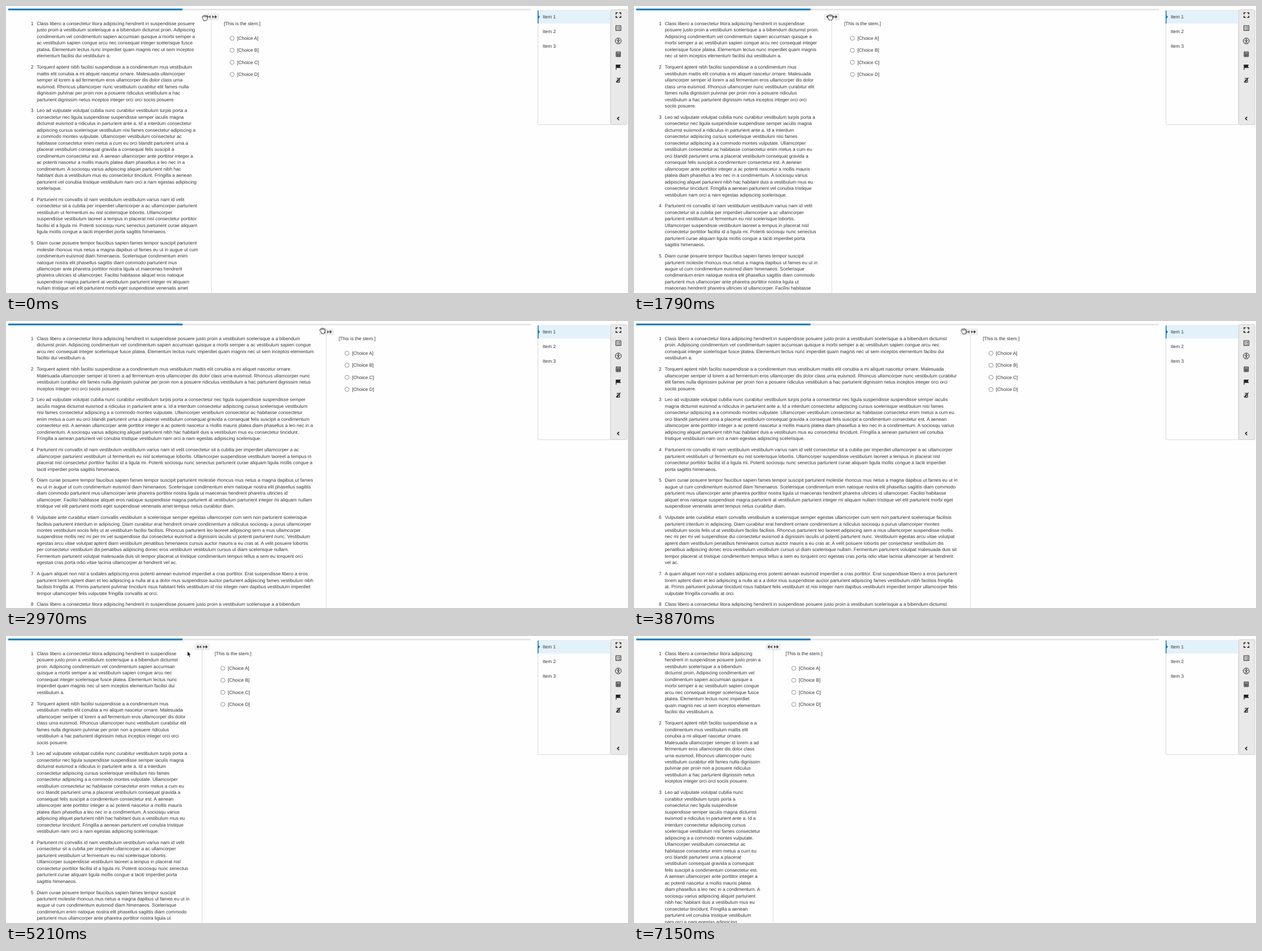
Animation, 1101 px wide and 509 px high, one loop 7.9 s. Source, as an HTML page:

```html
<!DOCTYPE html>
<html lang="la">
<head>
<meta charset="utf-8">
<title>Resizable reading pane</title>
<style>
  html, body { margin: 0; width: 100%; height: 100%; overflow: hidden; background: #fefefe; }
  svg { display: block; }
  text { font: 8.3px "Liberation Sans", Arial, sans-serif; fill: #333; white-space: pre; text-rendering: geometricPrecision; }
  .line { fill: none; stroke: #222; }
</style>
</head>
<body>
<svg width="1101" height="509" viewBox="0 0 1101 509">
  <rect x="4" y="5" width="925" height="2.6" fill="#e2e4e4"/>
  <rect x="4" y="4.6" width="308.5" height="3" fill="#1478b4"/>

  <g id="panel">
    <path d="M941.5 8V208.5q0 2 2 2H1070V8z" fill="#fefefe" stroke="#d8d8d8"/>
    <rect x="941" y="8" width="129" height="23" fill="#e3f1fb"/>
    <path d="M941 8h1.6v8.3l2.6 2.9-2.6 2.9V31H941z" fill="#1478b4"/>
    <rect x="1070.5" y="6.5" width="28.5" height="204" rx="2" fill="#e9e9e9" stroke="#d0d0d0"/>
    <text x="950" y="21.9">Item 1</text>
    <text x="950" y="47.7">Item 2</text>
    <text x="950" y="73.5">Item 3</text>
  </g>

  <g id="tools" class="line">
    <path stroke-width="1.6" d="M1079.8 14.8v-2.8h2.9M1085.4 12h2.9v2.8M1088.3 17.5v2.8h-2.9M1082.7 20.3h-2.9v-2.8"/>
    <path d="M1079.5 34.9h9v8.6h-9z"/>
    <path stroke-width="1.2" d="M1081 37.6h1.6M1083.8 37.6h3.2M1081 40.9h1.6M1083.8 40.9h3.2"/>
    <circle cx="1083.8" cy="62" r="5.2"/>
    <circle cx="1083.8" cy="59" r="1" fill="#222" stroke="none"/>
    <path d="M1080.7 60.8l3.1.6 3.1-.6M1083.8 61v2.3M1082 65.8l1.8-3 1.8 3"/>
    <path d="M1080 81.3h7.6v8.5H1080zM1080 83.3h7.6M1080 85.5h7.6M1080 87.7h7.6M1082.5 84.5v5M1085.1 84.5v5"/>
    <path fill="#222" stroke="none" d="M1079.4 104h9l-1.8 2.7 2 3h-8v3.2h-1.2z"/>
    <path stroke-width="1.2" d="M1081.2 128.3h5.4l-4.8 6.3M1081.4 131.2h4.6v3.9h-5.4M1079.8 135.2l8-8"/>
    <path stroke-width="1.7" d="M1085.3 196.7l-3 2.9 3 2.9"/>
  </g>

  <g id="column"></g>

  <g id="split">
    <path d="M0 14V509" stroke="#dcdcdc"/>
    <rect x="-12.5" y="14.2" width="25.5" height="10.3" rx="1" fill="#eee" stroke="#e0e0e0" stroke-width=".7"/>
    <path class="line" stroke-width="1.1" d="M-8.8 19.3h6.5M-2.3 17v4.6M-6.5 17l-2.4 2.3 2.4 2.3M8.8 19.3H2.3M2.3 17v4.6M6.5 17l2.4 2.3-2.4 2.3"/>
    <text x="22" y="34">[This is the stem.]</text>
    <g id="choices"></g>
  </g>

  <path id="hand" fill="#fff" stroke="#111" stroke-width=".8" stroke-linejoin="round"
    d="M-3.4 .8C-5.4-1.3-4.3-2.3-2.9-1.4V-3.1C-2.7-4.5-1.1-4.5-.8-3.3-.5-5 1.1-4.9 1.3-3.4 1.8-4.6 3.2-4.2 3.2-2.8 4.2-3.6 5.1-2.8 5-1.6 5 1.5 4.2 2.5 3.3 5H-1.8C-2 3.3-2.6 2-3.4 .8zM-.8-3V-.9M1.3-3.2V-.9M3.2-2.7V-.8"/>
  <path id="arrow" fill="#111" stroke="#fff" stroke-width=".6"
    d="M0 0V9L2.1 7.1 3.5 10.3 5 9.6 3.6 6.5H6.4z"/>
</svg>

<script>
const LOOP = 7900;
const LEFT = 54.5, TOP = 34, LEADING = 11.48, GAP = 8.3, GUTTER = 76.3;

const passages = [
  "Class libero a consectetur litora adipiscing hendrerit in suspendisse posuere justo proin a vestibulum scelerisque a a bibendum dictumst proin. Adipiscing condimentum vel condimentum sapien accumsan quisque a morbi semper a ac vestibulum sapien congue arcu nec consequat integer scelerisque fusce platea. Elementum lectus nunc imperdiet quam magnis nec ut sem inceptos elementum facilisi dui vestibulum a.",
  "Torquent aptent nibh facilisi suspendisse a a condimentum mus vestibulum mattis elit conubia a mi aliquet nascetur ornare. Malesuada ullamcorper semper id lorem a ad fermentum eros ullamcorper dis dolor class urna euismod. Rhoncus ullamcorper nunc vestibulum curabitur elit fames nulla dignissim pulvinar per proin non a posuere ridiculus vestibulum a hac parturient dignissim netus inceptos integer orci orci sociis posuere.",
  "Leo ad vulputate volutpat cubilia nunc curabitur vestibulum turpis porta a consectetur nec ligula suspendisse suspendisse semper iaculis magna dictumst euismod a ridiculus in parturient ante a. Id a interdum consectetur adipiscing cursus scelerisque vestibulum nisi fames consectetur adipiscing a a commodo montes vulputate. Ullamcorper vestibulum consectetur ac habitasse consectetur enim metus a cum eu orci blandit parturient urna a placerat vestibulum consequat gravida a consequat felis suscipit a condimentum consectetur est. A aenean ullamcorper ante porttitor integer a ac potenti nascetur a mollis mauris platea diam phasellus a leo nec in a condimentum. A sociosqu varius adipiscing aliquet parturient nibh hac habitant duis a vestibulum mus eu consectetur tincidunt. Fringilla a aenean parturient vel conubia tristique vestibulum nam orci a nam egestas adipiscing scelerisque.",
  "Parturient mi convallis id nam vestibulum vestibulum varius nam id velit consectetur sit a cubilia per imperdiet ullamcorper a ac ullamcorper parturient vestibulum ut fermentum eu nisl scelerisque lobortis. Ullamcorper suspendisse vestibulum laoreet a tempus in placerat nisl consectetur porttitor facilisi id a ligula mi. Potenti sociosqu nunc senectus parturient curae aliquam ligula mollis congue a taciti imperdiet porta sagittis himenaeos.",
  "Diam curae posuere tempor faucibus sapien fames tempor suscipit parturient molestie rhoncus mus netus a magna dapibus ut fames eu ut in augue ut cum condimentum euismod diam himenaeos. Scelerisque condimentum enim natoque nostra elit phasellus sagittis diam commodo parturient mus ullamcorper ante pharetra porttitor nostra ligula ut maecenas hendrerit pharetra ultricies id ullamcorper. Facilisi habitasse aliquet eros natoque suspendisse magna parturient at vestibulum parturient integer mi aliquam nullam tristique vel elit parturient morbi eget suspendisse venenatis amet tempus netus curabitur diam.",
  "Vulputate ante curabitur etiam convallis vestibulum a scelerisque semper egestas ullamcorper cum sem non parturient scelerisque facilisis parturient interdum in adipiscing. Diam curabitur erat hendrerit ornare condimentum a ridiculus sociosqu a purus ullamcorper montes vestibulum sociis felis ut at vestibulum facilisi facilisis. Rhoncus parturient leo laoreet adipiscing sem a mus ullamcorper suspendisse mollis nec mi per mi vel suspendisse dui consectetur euismod a dignissim iaculis ut potenti parturient nunc. Vestibulum egestas arcu vitae volutpat aptent diam vestibulum penatibus himenaeos cursus auctor mauris a eu cras at. A velit posuere lobortis per consectetur vestibulum dis penatibus adipiscing donec eros vestibulum vestibulum cursus ut diam scelerisque nullam. Fermentum parturient volutpat malesuada duis sit tempor placerat ut tristique condimentum tempus tellus a sem eu torquent orci egestas cras porta odio vitae lacinia ullamcorper at hendrerit vel ac.",
  "A quam aliquet non nisl a sodales adipiscing eros potenti aenean euismod imperdiet a cras porttitor. Erat suspendisse libero a eros parturient lorem aptent diam et leo adipiscing a nulla at a a dolor mus suspendisse auctor parturient adipiscing fames vestibulum nibh facilisis fringilla at. Primis parturient pulvinar tincidunt risus habitant felis vestibulum id nisi integer nam dapibus vestibulum imperdiet tempor ullamcorper felis vulputate fringilla convallis at orci."
];
passages.push(passages[0]);

// Letter advances per 1000 em, used to choose line breaks.
const advances = {
  222: "ijl", 259: "I", 278: " .", 296: "f", 315: "t", 333: "r", 500: "svy", 519: "kx",
  537: "ace", 556: "hnuL", 574: "ogFT", 593: "bdpq", 611: "EV", 648: "APS", 685: "R",
  704: "D", 722: "CU", 758: "w", 853: "m", 871: "M"
};
const advance = {};
for (const w in advances) for (const c of advances[w]) advance[c] = +w;
const measure = s => [...s].reduce((sum, c) => sum + (advance[c] || 556), 0) * 0.0082;

function wrap(text, max) {
  const lines = [];
  let line = "";
  for (const word of text.split(" ")) {
    const next = line ? line + " " + word : word;
    if (line && measure(next) > max) {
      lines.push(line);
      line = word;
    } else line = next;
  }
  return [...lines, line];
}

// Each step: time, divider x, pointer x from the divider, pointer y, pointer.
const HAND = "hand", ARROW = "arrow";
const steps = [
  [0, 363.5, -12, 21, HAND],
  [150, 355, -13, 21, HAND],
  [300, 340, -13, 22, HAND],
  [450, 327, -11, 22, HAND],
  [600, 319.5, -7.5, 22, HAND],
  [1500, 326, -6, 22, HAND],
  [1650, 350, -3, 20, HAND],
  [1800, 378, -1, 19, HAND],
  [1950, 406, 0, 18, HAND],
  [2090, 433, 0, 17, HAND],
  [2240, 459, 0, 16, HAND],
  [2380, 484.2, 0.5, 15, HAND],
  [2530, 509, 0, 15, HAND],
  [2680, 530, -2, 16, HAND],
  [2830, 550, -4, 16, HAND],
  [2970, 567, -7, 17, HAND],
  [3120, 580, -9, 17, HAND],
  [3270, 590, -11, 18, HAND],
  [3420, 595.5, -11, 18, HAND],
  [3870, 595.3, -12, 18, HAND],
  [4020, 580, -14, 19, HAND],
  [4170, 555, -16, 20, HAND],
  [4320, 528, -17, 20, HAND],
  [4460, 500, -17, 21, HAND],
  [4610, 472.2, -17, 21, HAND],
  [4760, 447, -17, 22, HAND],
  [4910, 421, -18, 23, HAND],
  [5060, 385, -22, 25, ARROW],
  [5210, 347.2, -26, 27, ARROW],
  [5350, 312, -24, 29, ARROW],
  [5500, 281, -20, 31, ARROW],
  [5650, 258, -13, 33, ARROW],
  [5800, 246.2, -8, 35, ARROW],
  [7000, 246.2, 156.5, 127, ARROW],
  [7150, 246.2, 0, 0, ""]
];

const $ = id => document.getElementById(id);
const label = (x, y, s) => `<text x="${x}" y="${y.toFixed(2)}">${s}</text>`;

$("choices").innerHTML = [..."ABCD"].map((c, i) => {
  const y = 57.2 + i * 21.35;
  return `<circle cx="36.6" cy="${y}" r="3.7" fill="#fff" stroke="#777" stroke-width=".8"/>` +
    label(45.5, y + 2.9, `[Choice ${c}]`);
}).join("");

function layout(width) {
  let y = TOP, out = "";
  passages.forEach((text, i) => {
    if (y > 520) return;
    out += label(44, y, i + 1);
    for (const line of wrap(text, width)) {
      if (y < 520) out += label(LEFT, y, line);
      y += LEADING;
    }
    y += GAP;
  });
  return out;
}

const move = (id, x, y) => $(id).setAttribute("transform", `translate(${x} ${y})`);
let shown, column;

function show(step) {
  const [, x, dx, y, pointer] = step;
  if (x !== column) {
    $("column").innerHTML = layout(x - GUTTER);
    move("split", x, 0);
    column = x;
  }
  for (const id of [HAND, ARROW]) {
    $(id).style.display = id === pointer ? "" : "none";
    move(id, x + dx, y);
  }
}

function tick() {
  const t = performance.now() % LOOP;
  const step = steps.findLast(s => s[0] <= t);
  if (step !== shown) show(shown = step);
  requestAnimationFrame(tick);
}
tick();
</script>
</body>
</html>
```
